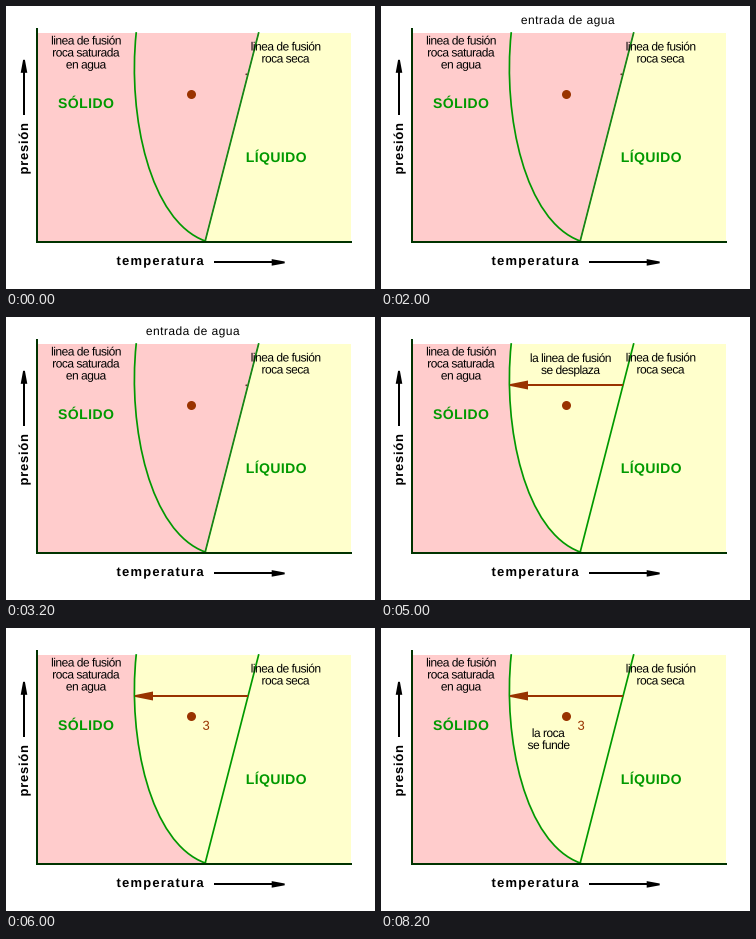
Write a matplotlib script that moves like this. It is 369 px wide and 283 px high and loops after 9 s.

```python
import matplotlib.pyplot as plt
from matplotlib.animation import FuncAnimation
from matplotlib.patches import Circle, PathPatch, Polygon, Rectangle
from matplotlib.path import Path
from matplotlib.textpath import TextPath
from matplotlib.transforms import Affine2D

W, H, DPI = 369, 283, 100
PINK, YELLOW = "#ffcccc", "#ffffcc"
GREEN, AXIS, BROWN = "#009900", "#003300", "#993300"

fig = plt.figure(figsize=(W / DPI, H / DPI), dpi=DPI, facecolor="white")
ax = fig.add_axes([0, 0, 1, 1])
ax.set_xlim(0, W)
ax.set_ylim(H, 0)
ax.axis("off")


def px(width):
    return width * 72 / DPI


def line(x, y, color, width, z=3):
    return ax.plot(x, y, color=color, lw=px(width), zorder=z,
                   solid_capstyle="butt")[0]


def shape(patch, color, z):
    patch.set(facecolor=color, edgecolor="none", linewidth=0, zorder=z)
    return ax.add_patch(patch)


def text(x, y, s, size=12, track=-0.5, color="black", bold=False,
         center=False, angle=0):
    """Draw letter-spaced text with its baseline at y."""
    prop = {"family": "Liberation Sans", "weight": "bold" if bold else "normal"}

    def right(t):
        return TextPath((0, 0), t, size=size, prop=prop).get_extents().x1

    def advance(t):
        return right(t + "l") - right("l") + track * len(t)

    glyphs = [TextPath((advance(s[:i]), 0), c, size=size, prop=prop)
              for i, c in enumerate(s) if c != " "]
    path = Path.make_compound_path(*glyphs)
    if center:
        box = path.get_extents()
        x -= (box.x0 + box.x1) / 2
    place = Affine2D().scale(1, -1).rotate_deg(angle).translate(x, y)
    return shape(PathPatch(place.transform_path(path)), color, 6)


def block(x, y, *rows):
    return [text(x, y + 12 * i, row, center=True)
            for i, row in enumerate(rows)]


def arrow(tail, tip, color, head, half, blunt=0.9):
    """Draw a straight arrow whose head ends in a slightly flat tip."""
    (x0, y0), (x1, y1) = tail, tip
    length = abs(x1 - x0) + abs(y1 - y0)
    ux, uy = (x1 - x0) / length, (y1 - y0) / length
    bx, by = x1 - ux * head, y1 - uy * head
    shaft = line([x0, bx + ux], [y0, by + uy], color, 2, 4)
    point = Polygon([(x + side * uy, y - side * ux) for x, y, side in
                     [(bx, by, half), (x1, y1, blunt),
                      (x1, y1, -blunt), (bx, by, -half)]])
    return [shaft, shape(point, color, 4)]


# Phase regions
TOP, FOOT, DRY_TOP = (130.2, 27), (199.2, 235), (252.6, 27)
BEND = [(121.5, 110), (144, 215)]
CURVE = [Path.MOVETO] + [Path.CURVE4] * 3
shape(Rectangle((32, 27), 313, 208), YELLOW, 0)
solid = Path([TOP, *BEND, FOOT, (32, 235), (32, 27), TOP],
             CURVE + [Path.LINETO] * 3)
shape(PathPatch(solid), PINK, 1)
between = Path([TOP, *BEND, FOOT, DRY_TOP, TOP], CURVE + [Path.LINETO] * 2)
dry_solid = [shape(PathPatch(between), PINK, 1)]

# Melting lines
ax.add_patch(PathPatch(Path([TOP, *BEND, FOOT], CURVE), fill=False,
                       edgecolor=GREEN, linewidth=px(1.7),
                       capstyle="projecting", zorder=3))
dry_x, dry_y = zip(FOOT, DRY_TOP)
line(dry_x, dry_y, GREEN, 1.7).set_solid_capstyle("projecting")
dry_solid.append(line(dry_x, dry_y, "#336633", 0.6, 4))
dry_solid.append(shape(Circle((240.3, 68.3), 0.9), "#663333", 4))

# Axes and labels
line([31, 31], [22, 237], AXIS, 2, 5)
line([30, 346], [236, 236], AXIS, 2, 5)
arrow((18, 109), (18, 53.8), "black", 13, 3.3)
arrow((208, 256.4), (278.7, 256.4), "black", 13, 3.3)
text(22, 168.5, "presión", 13, 0.75, bold=True, angle=-90)
text(110.5, 259, "temperatura", 13, 1.2, bold=True)
text(52, 102, "SÓLIDO", 14, 0.45, GREEN, True)
text(239.8, 156, "LÍQUIDO", 14, 0.4, GREEN, True)
block(80.3, 38.5, "linea de fusión", "roca saturada", "en agua")
block(279.9, 44.5, "linea de fusión", "roca seca")
shape(Circle((185.5, 88.5), 4.5), BROWN, 5)

# Parts shown only during [start, end) seconds
water = [text(187, 18, "entrada de agua", track=0.45, center=True)]
shift = arrow((241.5, 68), (129, 68), BROWN, 18, 4.5)
moves = block(189.7, 45, "la linea de fusión", "se desplaza")
number = [text(196.5, 101.8, "3", 13, 0, BROWN)]
melts = block(167.7, 109, "la roca", "se funde")
STEPS = [(dry_solid, 0, 4), (water, 2, 4), (shift, 4, 9), (moves, 5, 6),
         (number, 6, 9), (melts, 7, 9)]


def update(second):
    for parts, start, end in STEPS:
        for part in parts:
            part.set_visible(start <= second < end)
    return [part for parts, _, _ in STEPS for part in parts]


anim = FuncAnimation(fig, update, frames=9, interval=1000, repeat=True,
                     repeat_delay=0, blit=False)
plt.show()
```
